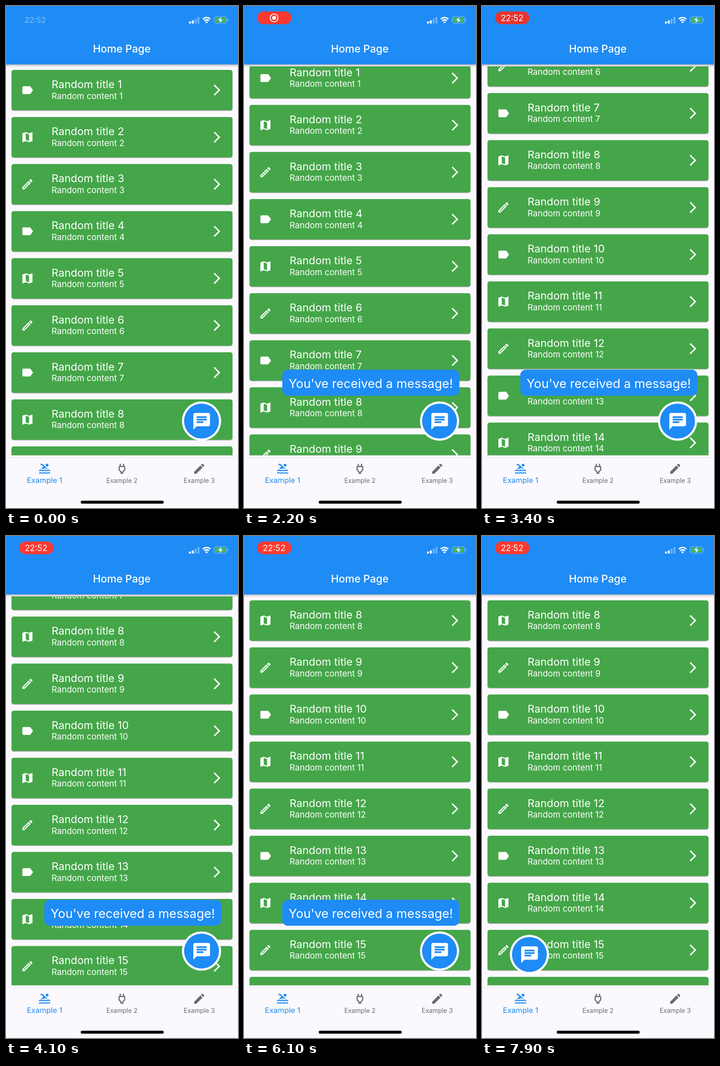
These frames come from a looping animation (509 by 1100 pixels, 8 s). An HTML page:

```html
<!DOCTYPE html>
<html lang="en">
<head>
<meta charset="utf-8">
<title>Home Page</title>
<style>
  html, body { margin: 0; width: 100%; height: 100%; overflow: hidden; background: #fbf9fd; }
  svg { display: block; width: 100vw; height: 100vh; }
  text { font-family: Inter, Roboto, sans-serif; font-optical-sizing: none; }
  .mid { text-anchor: middle; }
</style>
</head>
<body>
<svg viewBox="0 0 509 1100">
  <defs>
    <path id="label" d="M17.63 5.84C17.27 5.33 16.67 5 16 5L5 5.01C3.9 5.01 3 5.9 3 7v10c0 1.1.9 1.99 2 1.99L16 19c.67 0 1.27-.33 1.63-.84L22 12z"/>
    <path id="map" d="M20.5 3l-.16.03L15 5.1 9 3 3.36 4.9c-.21.07-.36.25-.36.48V20.5c0 .28.22.5.5.5l.16-.03L9 18.9l6 2.1 5.64-1.9c.21-.07.36-.25.36-.48V3.5c0-.28-.22-.5-.5-.5zM15 19l-6-2.11V5l6 2.11z"/>
    <path id="pencil" d="M14.06 9.02l.92.92L5.92 19H5v-.92zM17.66 3c-.25 0-.51.1-.7.29l-1.83 1.83 3.75 3.75 1.83-1.83c.39-.39.39-1.02 0-1.41l-2.34-2.34c-.2-.2-.45-.29-.71-.29zm-3.6 3.19L3 17.25V21h3.75L17.81 9.94z"/>
    <path id="arrow" d="M6.23 20.23L8 22l10-10L8 2 6.23 3.77 14.46 12z"/>
    <path id="chat" d="M20 2H4c-1.1 0-1.99.9-1.99 2L2 22l4-4h14c1.1 0 2-.9 2-2V4c0-1.1-.9-2-2-2zM6 9h12v2H6zm8 5H6v-2h8zm4-6H6V6h12z"/>
    <path id="plug" d="M16 9v4.66l-3.5 3.51V19h-1v-1.83L8 13.65V9h8m0-6h-2v4h-4V3H8v4C6.9 7 6 7.89 6 8.98v5.52L9.5 18v3h5v-3l3.5-3.51V9c0-1.1-.9-2-2-2z"/>
    <path id="edit" d="M3 17.25V21h3.75L17.81 9.94l-3.75-3.75zM20.71 7.04c.39-.39.39-1.02 0-1.41l-2.34-2.34c-.39-.39-1.02-.39-1.41 0l-1.83 1.83 3.75 3.75z"/>
    <path id="wave" d="M2 20c1.7 0 1.7-1 3.33-1s1.67 1 3.33 1 1.67-1 3.33-1 1.67 1 3.33 1 1.67-1 3.33-1 1.67 1 3.33 1" fill="none" stroke="#1f8bf5" stroke-width="2"/>
    <g id="pool">
      <use href="#wave"/><use href="#wave" y="-4.5"/>
      <circle cx="16.5" cy="5.5" r="2.5"/>
      <path d="M5 3v2.5c1.5 0 2.3.3 3.2 1.1L10 8l-4 4c1.5 1 3 .8 4.5-.2s3-1 4.5 0 2 .6 2.5.4L9.6 4.6C8.4 3.4 7 3 5 3z"/>
    </g>
    <clipPath id="view"><rect y="132.5" width="509" height="852"/></clipPath>
    <linearGradient id="shade" x2="0" y2="1">
      <stop stop-opacity=".36"/><stop offset=".4" stop-opacity=".13"/><stop offset="1" stop-opacity="0"/>
    </linearGradient>
  </defs>

  <rect width="509" height="1100" fill="#fbf9fd"/>
  <g clip-path="url(#view)"><g id="list" fill="#fff"></g></g>

  <rect y="127" width="509" height="8" fill="url(#shade)"/>
  <rect width="509" height="128" fill="#1f8bf5"/>
  <text class="mid" x="254" y="102" font-size="23" font-weight="500" fill="#fff">Home Page</text>

  <g fill="#fff">
    <text id="clock" class="mid" x="64" y="37" font-size="16.7" font-weight="600">22:52</text>
    <g id="pill">
      <rect id="pillBack" x="29" y="12" width="75" height="28" rx="14"/>
      <g id="record">
        <circle cx="66" cy="26" r="8.6" fill="none" stroke="#fff" stroke-width="1.9"/>
        <circle cx="66" cy="26" r="4.4"/>
      </g>
      <text id="pillClock" class="mid" x="66" y="32.5" font-size="18.3">22:52</text>
    </g>
    <rect x="401.5" y="34" width="4.2" height="4.5" rx="1"/>
    <rect x="407.7" y="31.5" width="4.2" height="7" rx="1"/>
    <rect x="413.9" y="28" width="4.2" height="10.5" rx="1" opacity=".35"/>
    <rect x="420.1" y="24" width="4.2" height="14.5" rx="1" opacity=".35"/>
    <g fill="none" stroke="#fff" stroke-width="3">
      <path d="M431.7 28.6a11.8 11.8 0 0 1 16.6 0"/>
      <path d="M435 32.3a7.2 7.2 0 0 1 10 0"/>
    </g>
    <path d="M440 38.3l-3.1-3.2a4.4 4.4 0 0 1 6.2 0z"/>
    <rect x="456.5" y="23" width="28" height="15" rx="4.5" fill="none" stroke="#fff" stroke-opacity=".5" stroke-width="1.2"/>
    <path d="M486 28.2q2 .6 2 2.4t-2 2.4z" opacity=".5"/>
    <rect x="458.5" y="25" width="24" height="11" rx="2.8" fill="#3dbb58"/>
    <path d="M473 22.5l-8.3 9h5l-2.2 7.5 8.6-9.6h-5.1z" stroke="#1f8bf5" stroke-width=".6"/>
  </g>

  <g id="message">
    <rect x="84" y="797" width="388.5" height="57" rx="12" fill="#1f8bf5"/>
    <text class="mid" x="278" y="836.5" font-size="27.2" fill="#fff">You've received a message!</text>
  </g>

  <path d="M0 989.5H509" stroke="#e9e8ec"/>
  <g id="tabs"></g>
  <rect x="164" y="1084" width="182" height="6.4" rx="3.2"/>

  <g id="fab">
    <circle r="43" fill="#fff"/>
    <circle r="38.3" fill="#1f8bf5"/>
    <use href="#chat" fill="#fff" transform="translate(.3 .6) scale(1.83) translate(-12 -12)"/>
  </g>
</svg>

<script>
const $ = id => document.getElementById(id);
const LOOP = 8000, STEP = 100, PITCH = 103.14;

const icon = (name, x, y, fill) =>
  `<use href="#${name}" fill="${fill}" transform="translate(${x} ${y}) scale(1.23) translate(-12 -12)"/>`;

const card = (_, i) => `<g transform="translate(0 ${140 + i * PITCH})">
  <rect x="12" y="1.3" width="485" height="88.8" rx="5" fill="#000" opacity=".28"/>
  <rect x="12" width="485" height="88.6" rx="5" fill="#45a649"/>
  ${icon(["label", "map", "pencil"][i % 3], 47, 44.3, "#fff")}
  <text x="100" y="40" font-size="23.5">Random title ${i + 1}</text>
  <text x="100" y="63.5" font-size="18.5">Random content ${i + 1}</text>
  ${icon("arrow", 462.7, 44.3, "#fff")}
</g>`;
$("list").innerHTML = Array.from({ length: 17 }, card).join("");

$("tabs").innerHTML = ["pool", "plug", "edit"].map((name, i) => {
  const x = 84.6 + i * 169.7, fill = i ? "#6b6a6d" : "#1f8bf5";
  return icon(name, x, 1014, fill) +
    `<text class="mid" x="${x}" y="1045.3" font-size="${i ? 13.9 : 16.5}" fill="${fill}">Example ${i + 1}</text>`;
}).join("");

// time, offset, speed per ms
const scrollKeys = [[2050, 0, 0], [2700, 284, .45], [3400, 568, .27], [4100, 685.5, .09], [4900, 721, 0]];

const ramp = (t, from, to) => Math.min(1, Math.max(0, (t - from) / (to - from)));
const smooth = u => u * u * (3 - 2 * u);

function scrollAt(t) {
  const i = scrollKeys.findIndex(key => t < key[0]);
  if (i < 1) return i ? 721 : 0;
  const [t0, y0, v0] = scrollKeys[i - 1], [t1, y1, v1] = scrollKeys[i];
  const d = t1 - t0, u = (t - t0) / d, w = 1 - u;
  return y0 + (y1 - y0) * smooth(u) + d * u * w * (v0 * w - v1 * u);
}

function draw(t) {
  $("list").setAttribute("transform", `translate(0 ${-scrollAt(t)})`);
  $("clock").setAttribute("opacity", .36 * (1 - ramp(t, 0, 200)));
  $("pill").setAttribute("opacity", ramp(t, 0, 300));
  const glow = .5 + .5 * Math.cos(t * Math.PI / 1000);
  $("pillBack").setAttribute("fill", `rgb(${216 + 38 * glow},${50 + 8 * glow},${46 + 3 * glow})`);
  const swap = ramp(t, 2900, 3200);
  $("record").setAttribute("opacity", 1 - swap);
  $("pillClock").setAttribute("opacity", swap);
  $("message").setAttribute("opacity", ramp(t, 1500, 1830) * (1 - ramp(t, 6500, 6830)));
  const drag = smooth(ramp(t, 6800, 7900));
  $("fab").setAttribute("transform", `translate(${429 - 325 * drag} ${909.5 + 7.5 * drag})`);
}

(function tick() {
  draw(Math.floor(performance.now() % LOOP / STEP) * STEP);
  requestAnimationFrame(tick);
})();
</script>
</body>
</html>
```
